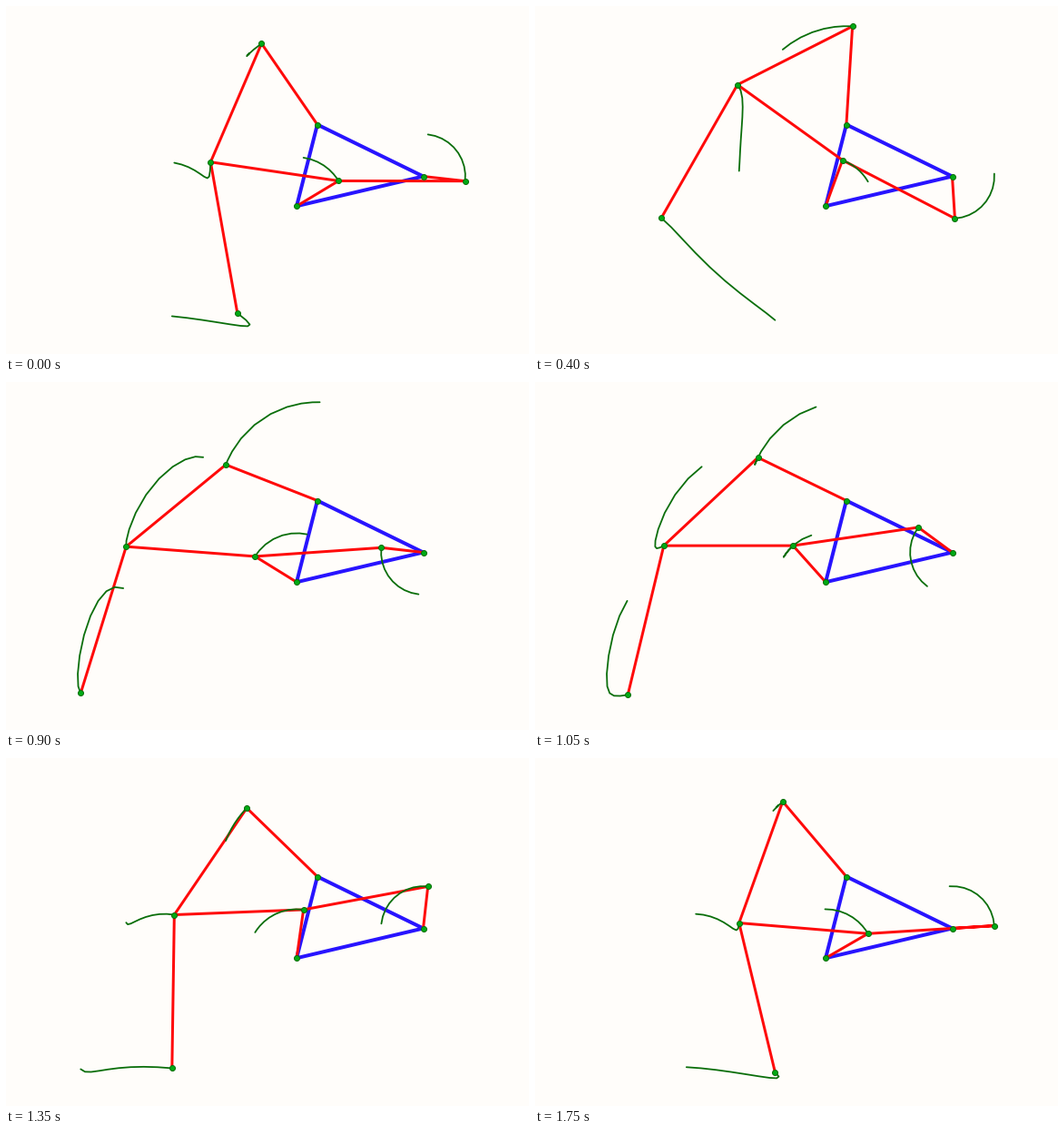
Animation of 576 by 383 pixels, one loop 1.8 s. Source, as a matplotlib script:

```python
import numpy as np
import matplotlib.pyplot as plt
from matplotlib.animation import FuncAnimation

W, H, DPI = 576, 383, 64
PX = 72 / DPI                      # one pixel in points
FRAMES, TRAIL = 36, 9

BG, BLUE, RED = "#fffdfa", "#2814ff", "#ff0a0a"
GREEN, DARK = "#00aa14", "#0a6e0a"

# Fixed pivots: crank axle, lower rocker, upper rocker
AXLE = 459 + 187j
LOW = 319.6 + 219.7j
TOP = 342.4 + 130j

CRANK, ROD, LOW_ARM = 46.4, 139.4, 53.8
REACH, TOP_ARM, THIGH, SHIN = 142.4, 108.3, 142.0, 168.9
ROD_BEND, KNEE_BEND = np.radians(8.3), np.radians(-33.35)


def unit(z):
    return z / abs(z)


def joint(p, q, rp, rq):
    """Point at distance rp from p and rq from q, on the upper side."""
    d = abs(q - p)
    a = (rp**2 - rq**2 + d**2) / (2 * d)
    h = np.sqrt(rp**2 - a**2)
    u = unit(q - p)
    if u.real < 0:
        h = -h
    return p + u * (a - 1j * h)


def pose(k):
    """Crank pin, elbow, knee, hip and foot at step k."""
    crank = AXLE + CRANK * np.exp(1j * np.radians(6.4 + 360 * k / FRAMES))
    elbow = joint(LOW, crank, LOW_ARM, ROD)
    knee = elbow + REACH * unit(elbow - crank) * np.exp(1j * ROD_BEND)
    hip = joint(knee, TOP, THIGH, TOP_ARM)
    foot = knee + SHIN * unit(knee - hip) * np.exp(1j * KNEE_BEND)
    return np.array([crank, elbow, knee, hip, foot])


poses = np.array([pose(k) for k in range(FRAMES)])

fig = plt.figure(figsize=(W / DPI, H / DPI), dpi=DPI, facecolor=BG)
ax = fig.add_axes([0, 0, 1, 1])
ax.set(xlim=(0, W), ylim=(H, 0))
ax.axis("off")


def line(color, width, **kw):
    return ax.plot([], [], color=color, lw=width * PX,
                   solid_capstyle="round", solid_joinstyle="round", **kw)[0]


def place(artist, pts):
    pts = np.asarray(pts) + 0.5 + 0.5j
    artist.set_data(pts.real, pts.imag)


place(line(BLUE, 4), [TOP, AXLE, LOW, TOP])
bars = [line(RED, 3) for _ in range(4)]
trails = [line(DARK, 1.8) for _ in range(5)]
nodes = line("none", 0, marker="o", ms=6 * PX, mfc=GREEN, mec=DARK,
             mew=1 * PX)


def draw(k):
    crank, elbow, knee, hip, foot = poses[k]
    chains = ([AXLE, crank, elbow, knee], [LOW, elbow],
              [TOP, hip, knee], [knee, foot])
    for bar, chain in zip(bars, chains):
        place(bar, chain)
    past = poses[np.arange(k - TRAIL, k + 1) % FRAMES]
    for trail, pts in zip(trails, past.T):
        place(trail, pts)
    place(nodes, [AXLE, LOW, TOP, *poses[k]])
    return [*bars, *trails, nodes]


anim = FuncAnimation(fig, draw, frames=FRAMES, interval=50, repeat=True,
                     repeat_delay=0, init_func=lambda: draw(0))
plt.show()
```
